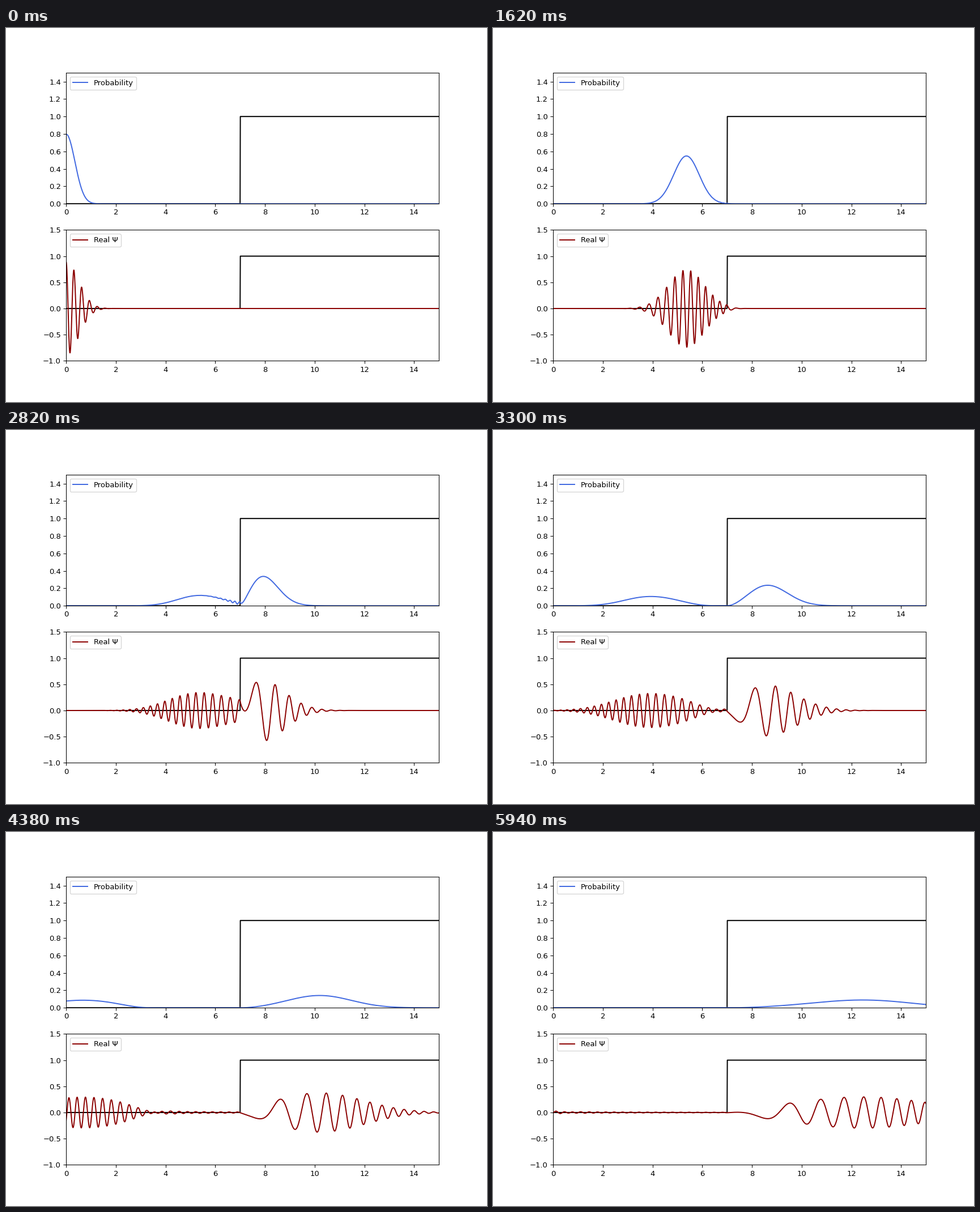
Write a matplotlib script that moves like this. It is 849 px wide and 660 px high and loops after 6 s.

```python
import numpy as np
import matplotlib.pyplot as plt
from matplotlib.animation import FuncAnimation

WIDTH, HEIGHT, DPI = 849, 660, 94.3
FRAMES, INTERVAL = 100, 60

DX = 0.01
SIGMA, K0 = 0.5, 20.0
STEP_X, STEP_HEIGHT = 7.0, 175.0
FRAME_TIME, SUBSTEPS = 0.01, 50

plt.rcParams["font.family"] = "DejaVu Sans"

x = (np.arange(4096) - 1400) / 100
step = np.where(x > STEP_X, 1.0, 0.0)


def evolve():
    """Split-step evolution of a Gaussian packet hitting a potential step."""
    dt = FRAME_TIME / SUBSTEPS
    k = 2 * np.pi * np.fft.fftfreq(x.size, DX)
    # kinetic energy of the three-point finite difference Laplacian
    kinetic = np.exp(-1j * dt * (1 - np.cos(k * DX)) / DX**2)
    half = np.exp(-0.5j * dt * STEP_HEIGHT * step)
    full = half**2

    norm = 1 / np.sqrt(SIGMA * np.sqrt(2 * np.pi))
    psi = norm * np.exp(-x**2 / (2 * SIGMA**2) + 1j * K0 * x)
    states = [psi]
    for _ in range(FRAMES - 1):
        psi = psi * half
        for _ in range(SUBSTEPS):
            psi = np.fft.ifft(kinetic * np.fft.fft(psi)) * full
        psi = psi / half
        states.append(psi)
    return states


def make_panel(ax, color, label, ylim):
    ax.plot(x, step, color="black")
    line, = ax.plot([], [], color=color, label=label)
    ax.set_xlim(0, 15)
    ax.set_ylim(*ylim)
    ax.legend(loc="upper left")
    return line


states = evolve()

# the small margin keeps the pixel size from being rounded down
fig, (top, bottom) = plt.subplots(
    2, 1, figsize=((WIDTH + 0.01) / DPI, (HEIGHT + 0.01) / DPI), dpi=DPI)
prob_line = make_panel(top, "royalblue", "Probability", (0, 1.5))
real_line = make_panel(bottom, "darkred", "Real Ψ", (-1, 1.5))


def update(i):
    psi = states[i]
    prob_line.set_data(x, np.abs(psi)**2)
    real_line.set_data(x, psi.real)
    return prob_line, real_line


anim = FuncAnimation(fig, update, frames=FRAMES, interval=INTERVAL,
                     repeat=True, repeat_delay=0)
plt.show()
```
